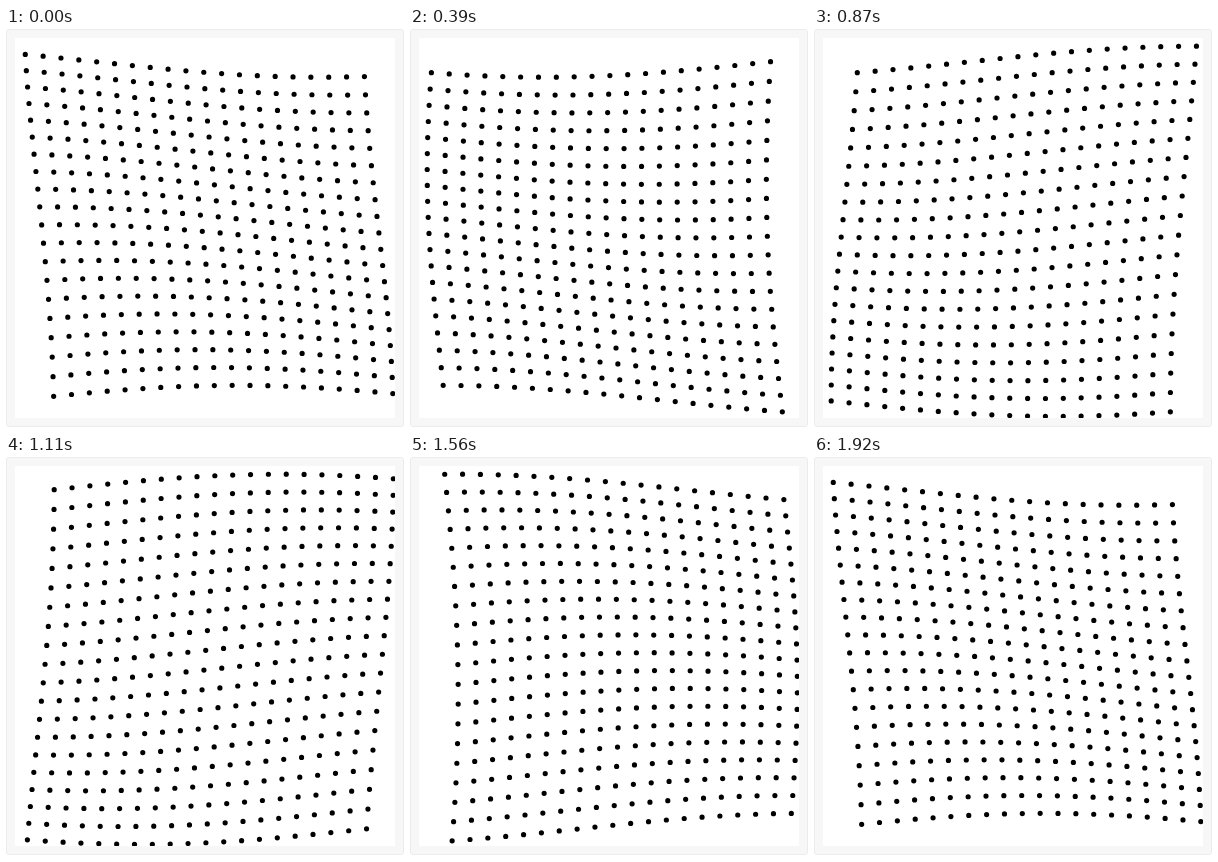
These frames come from a looping animation (398 by 400 pixels, 1950 ms). An HTML page with a canvas:

```html
<!DOCTYPE html>
<html lang="en">
<head>
<meta charset="utf-8">
<title>Dot wave</title>
<style>
html, body { margin: 0; width: 100%; height: 100%; overflow: hidden; background: #fff; }
canvas {
  position: absolute; left: 0; top: 1px; box-sizing: border-box;
  width: 398px; height: 398px; padding: 8px;
  border: 1px solid #ececec; border-radius: 3px;
  background: #f7f7f7;
}
</style>
</head>
<body>
<canvas id="stage" width="380" height="380"></canvas>
<script>
const ctx = document.getElementById("stage").getContext("2d");
const COUNT = 20, GAP = 17.85, SWING = 15.5, RADIUS = 2.6;
const STEP = 30, STEPS = 65;
const rad = deg => deg * Math.PI / 180;
const LAG = rad(7.1); // phase difference between neighbours

function draw(turn) {
  ctx.fillStyle = "#fff";
  ctx.fillRect(0, 0, 380, 380);
  ctx.fillStyle = "#000";
  ctx.beginPath();
  for (let row = 0; row < COUNT; row++) {
    const phase = turn - LAG * row;
    const shift = 23.7 - SWING * Math.sin(phase + rad(60));
    for (let col = 0; col < COUNT; col++) {
      const x = shift + GAP * col;
      const y = 23.7 + GAP * row + SWING * Math.sin(phase + LAG * col - rad(28));
      ctx.moveTo(x + RADIUS, y);
      ctx.arc(x, y, RADIUS, 0, 2 * Math.PI);
    }
  }
  ctx.fill();
}

const start = performance.now();
function tick() {
  const step = Math.floor((performance.now() - start) / STEP) % STEPS;
  draw(2 * Math.PI * step / (STEPS - 1)); // last step equals the first
  requestAnimationFrame(tick);
}
tick();
</script>
</body>
</html>
```
